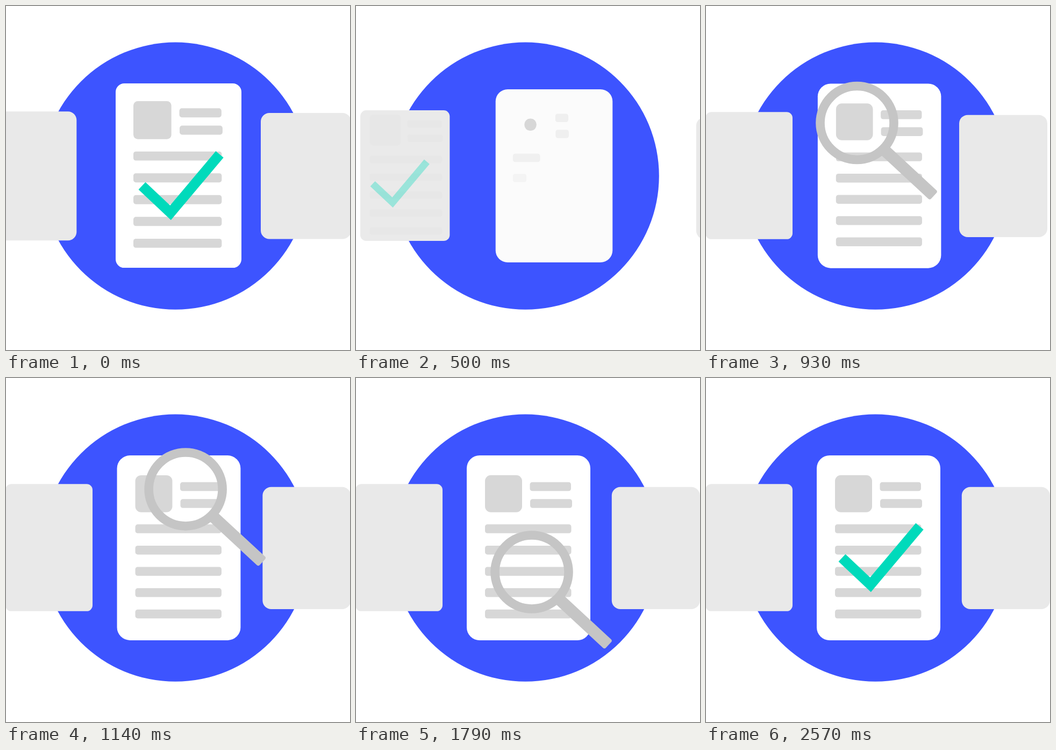
Animation, 640 px wide and 640 px high, one loop 2870 ms. Source, as an HTML page with a canvas:

```html
<!DOCTYPE html>
<html lang="en">
<head>
<meta charset="utf-8">
<title>Document review</title>
<style>
html, body { margin: 0; width: 100%; height: 100%; overflow: hidden; background: #fff; }
canvas { display: block; width: 640px; height: 640px; }
</style>
</head>
<body>
<canvas id="stage" width="640" height="640"></canvas>
<script>
const ctx = document.getElementById('stage').getContext('2d');
const LOOP = 2870, RATE = 14, LAST = 36;
const BAR = '#d7d7d7', CARD = '#e9e9e9', LENS = '#c5c5c5', TICK = '#00dabb', DISC = '#3d54ff';

const clamp = v => Math.max(0, Math.min(1, v));
const smooth = v => { const u = clamp(v); return u * u * (3 - 2 * u); };
const mix = (a, b, u) => a.map((v, i) => v + (b[i] - v) * u);
const gray = v => `rgb(${[v, v, v].map(Math.round)})`;

// Rises past 1 within ten steps, then rings out
function spring(n, over) {
  if (n < 10) return (1 + over) * smooth(n / 10) ** 1.1;
  const m = n - 10;
  return 1 + over * Math.exp(-0.4 * m) * Math.cos(0.7 * m);
}

function box(x, y, w, h, r, fill, alpha = 1) {
  if (w <= 0 || h <= 0 || alpha <= 0) return;
  ctx.globalAlpha = alpha;
  ctx.fillStyle = fill;
  ctx.beginPath();
  ctx.roundRect(x, y, w, h, Math.min(r, w / 2, h / 2));
  ctx.fill();
  ctx.globalAlpha = 1;
}

// Portrait and text bars; grown(row) gives the share of a row already written
function content(x, y, scale, radius, pop, alpha, grown) {
  ctx.save();
  ctx.translate(x, y);
  ctx.scale(scale, scale);
  const side = 69 * pop, gap = (69 - side) / 2;
  box(gap, gap, side, side, radius, BAR, alpha);
  const bar = (bx, by, w, g) => box(bx, by, w * g, 16.5, 4.5, BAR, alpha * g);
  for (let i = 0; i < 2; i++) bar(83.5 + i / 2, 13 + 31.5 * i, 76.5 + 1.5 * i, grown(0));
  for (let i = 0; i < 5; i++) bar(0, 91.5 + 39.6 * i, 160.5, grown(i));
  ctx.restore();
}

// Tick centred on (x, y), drawn up to the given share of its length
function tick(x, y, scale, alpha, share) {
  if (alpha <= 0 || share <= 0) return;
  const bend = 0.34;
  const a = clamp(share / bend), b = clamp((share - bend) / (1 - bend));
  ctx.save();
  ctx.translate(x, y);
  ctx.scale(scale, scale);
  ctx.globalAlpha = alpha;
  ctx.strokeStyle = TICK;
  ctx.lineWidth = 18.8;
  ctx.beginPath();
  ctx.moveTo(-73, 0.7);
  ctx.lineTo(-73 + 53 * a, 0.7 + 50 * a);
  if (b > 0) ctx.lineTo(-20 + 91.5 * b, 50.7 - 108.7 * b);
  ctx.stroke();
  ctx.restore();
}

function lens([x, y]) {
  ctx.save();
  ctx.translate(x, y);
  ctx.strokeStyle = LENS;
  ctx.lineWidth = 16.6;
  ctx.beginPath();
  ctx.arc(0, 0, 68.5, 0, Math.PI * 2);
  ctx.stroke();
  ctx.rotate(42.8 * Math.PI / 180);
  box(64, -8.5, 133, 22, 4, LENS);
  ctx.restore();
}

// Three reading sweeps of the lens, each on a slight arc
const ROWS = [
  { start: 13, end: 18, from: [281, 217.5], to: [363, 215], sag: -10 },
  { start: 20, end: 23, from: [278.5, 308], to: [363, 315], sag: 25 },
  { start: 26, end: 30, from: [291, 407], to: [365, 402], sag: 14 }
];

function lensAt(n) {
  const u = (n - 10) / 3;
  if (u < 1) return mix([520, 760], ROWS[0].from, u * (2 - u));
  for (const [i, row] of ROWS.entries()) {
    if (n <= row.end) {
      const s = smooth((n - row.start) / (row.end - row.start));
      const [x, y] = mix(row.from, row.to, s);
      return [x, y + row.sag * Math.sin(Math.PI * s)];
    }
    const next = ROWS[i + 1], pause = row.end + 1;
    if (next && n < next.start) {
      return mix(row.to, next.from, clamp((n - pause) / (next.start - pause)));
    }
  }
  return mix(ROWS[2].to, [660, 740], clamp((n - 31) / 3) ** 2);
}

function leavingCards(n) {
  const q = smooth(n / 8);
  box(-40 - 300 * q, 196.3, 171.3, 240, 16, CARD);

  const size = q ** 1.43;
  const w = 234 - 72 * size, h = 343 - 106.5 * size;
  const cx = 321 - 241 * q ** 1.08;
  box(cx - w / 2, 315.6 - h / 2, w, h, 16 - 5 * q, gray(255 - 22 * q));
  content(237 - 221 * q, 177 + 26 * q, 1.024 - 0.194 * q, 8, 1,
    1 - smooth((n - 4) / 4), () => 1);
  tick(326 - 255 * q, 334 - 4 * q, 1 - 0.316 * q, 1 - smooth(n / 11.5), 1);
}

function enteringCards(n) {
  const late = 1 - spring(1.2 * (n - 3.75), 0.045);
  box(475.8 + 230 * late, 202.8 + 6 * late, 164, 227.2, 16, CARD);

  const p = spring(n, 0.045);
  const w = 168 + 62 * p, h = 234.5 + 109.5 * p;
  const x = 474 - 268 * p, y = 199 - 55 * p;
  box(x, y, w, h, 16 + 8 * p, gray(233 + 22 * clamp(p)));
  const s = w / 230;
  content(x + w / 2 - 81 * s, y + h / 2 - 135.2 * s, s, 11, spring(2 * (n - 5), 0.08), 1,
    row => clamp((n - 5.5 - 0.75 * row) / 4.5));
}

function draw(n) {
  ctx.fillStyle = '#fff';
  ctx.fillRect(0, 0, 640, 640);
  ctx.fillStyle = DISC;
  ctx.beginPath();
  ctx.arc(315.2, 316.2, 248.6, 0, Math.PI * 2);
  ctx.fill();
  leavingCards(n);
  enteringCards(n);
  tick(326, 334, 1, 1, smooth((n - 32) / 4));
  if (n > 10 && n < 34) lens(lensAt(n));
}

function frame(now) {
  const t = now % LOOP;
  draw(Math.min(LAST, Math.floor((t + 5) * RATE / 1000)));
  requestAnimationFrame(frame);
}
draw(0);
requestAnimationFrame(frame);
</script>
</body>
</html>
```
